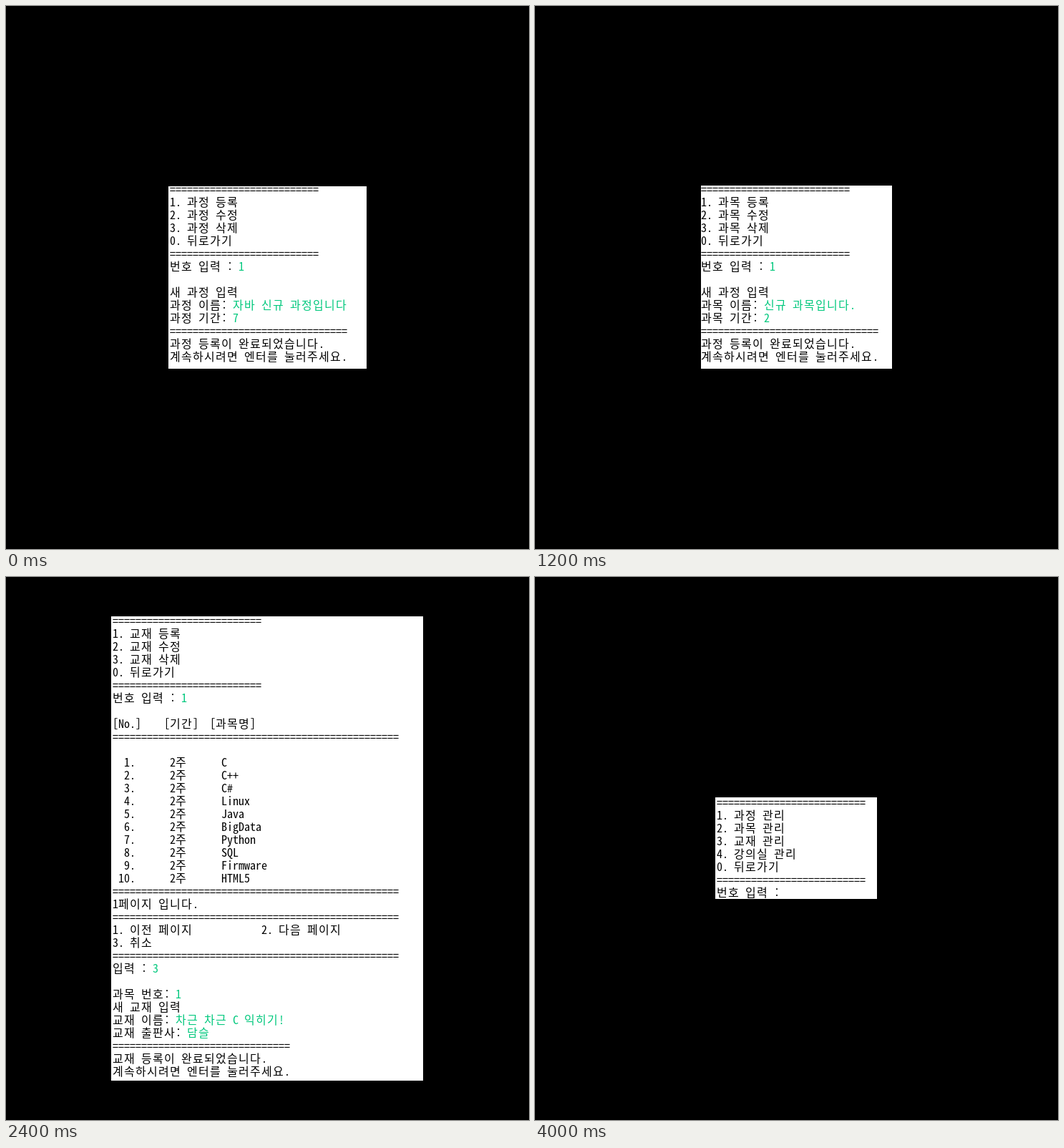
An HTML page for the animation above (4400 ms loop, 731 by 759 pixels).

```html
<!DOCTYPE html>
<html lang="ko">
<head>
<meta charset="utf-8">
<title>콘솔 화면</title>
<style>
  html, body { margin: 0; width: 100%; height: 100%; overflow: hidden; background: #000; }
  svg { display: block; }
  text {
    font: 16px "Noto Sans Mono CJK KR", "Noto Sans Mono CJK JP", "Noto Sans CJK KR", "Noto Sans CJK JP", monospace;
    white-space: pre;
    fill: #000;
  }
  .in { fill: #00c87d; }
</style>
</head>
<body>
<svg id="stage" width="731" height="759" viewBox="0 0 731 759"></svg>
<script>
const STEP = 400, COL = 8, ROW = 18;
const stage = document.getElementById('stage');

const bar = n => '='.repeat(n);
const pressEnter = '계속하시려면 엔터를 눌러주세요.';
const back = '0. 뒤로가기';
const book = '차근 차근 C 익히기!', press = '담슬';

// Everything after ^ is typed by the user.
const menu = (what, pick) => [
  bar(26), `1. ${what} 등록`, `2. ${what} 수정`, `3. ${what} 삭제`, back, bar(26), `번호 입력 : ^${pick}`, ''
];
const mainMenu = pick => [
  bar(26), '1. 과정 관리', '2. 과목 관리', '3. 교재 관리', '4. 강의실 관리', back, bar(26), `번호 입력 : ^${pick}`
];
const pager = page => [
  bar(50), `${page}페이지 입니다.`, bar(50),
  '1. 이전 페이지' + ' '.repeat(12) + '2. 다음 페이지', '3. 취소', bar(50), '입력 : ^3', ''
];
const done = msg => [`${msg} 완료되었습니다.`, pressEnter];
const edit = (what, no, fields) => [
  back, `수정할 ${what} 번호 입력:^${no}`, '', bar(27), '수정할 내용을 입력하세요.',
  ...fields, bar(31), ...done(what + ' 수정이')
];
const remove = (what, no) => [
  back, `삭제할 ${what} 번호 입력:^${no}`, '', bar(27), ...done(what + ' 삭제가')
];

const courses = [
  '5.5|자바(JAVA)를 활용한 풀스택 융합 SW개발자 양성과정',
  '6|JAVA기반의 스마트 웹 앱콘텐츠 양성과정',
  '5.5|Java/JavaScript library을 활용한 반응형',
  '7|빅데이터 UI 서비스 개발자 양성과정',
  '5.5|Java기반 멀티 플랫폼 SW개발자 양성 과정',
  '6|파이썬기반빅데이터개발자',
  '6|Java/Python을 활용한 웹 애플리케이션 개발자 양성과정',
  '7|자바 기반 모바일 융합SW 개발자 양성과정',
  '7|빅데이터분석을 위한 AI(머신러닝,딥러닝)응용소프트웨어 개발자',
  '5.5|웹기반응용SW개발자양성',
  '7|자바 스프링 백엔드 개발자 양성 과정',
  '6|스마트웹콘텐츠개발(웹디자인/웹퍼블리셔) 전문가 양성과정',
  '5.5|빅데이터 시각화를 통한 빅데이터 UI 콘텐츠 개발',
  '6|스마트웹/콘텐츠개발(웹퍼블리셔)양성과정',
  '7|스마트웹/콘텐츠개발(웹/멀티미디어)',
  '5.5|디지털컨버전스 기반 자바 Open Source Web application 전문 개발자 양성과정',
  '7|디지털컨버전스 기반 Framework 전문 개발자 양성과정',
  '5.5|UI/UX디자인 웹퍼블리셔 / 프론트엔드 개발자 양성과정 (N.09) G',
  '6|빅데이터를 활용한 지능형웹(UI/UX) 개발자',
  '5.5|오픈소스 프레임워크기반의 자바 웹 개발자 양성 과정'
];
const courseList = last => [
  bar(84), '[No.]    [기간]  [과정명]',
  ...[...courses, last].map((c, i) => {
    const [months, name] = c.split('|');
    return `${i + 1}`.padStart(4) + months.padStart(7) + '개월  ' + name;
  }),
  bar(84)
];
const tenRows = first => Array.from({ length: 10 }, (_, i) => ` ${41 + i}.` + (i ? '' : first));
const subjects = ['C', 'C++', 'C#', 'Linux', 'Java', 'BigData', 'Python', 'SQL', 'Firmware', 'HTML5'];
const gap = ' '.repeat(6);

// box: left, top, right, bottom; x: first column; y: middle of the first row
const scenes = [
  { box: [227, 252, 504, 507], x: 229, y: 256, rows: [
    ...menu('과정', 1), '새 과정 입력', '과정 이름: ^자바 신규 과정입니다', '과정 기간: ^7',
    bar(31), ...done('과정 등록이')] },
  { box: [2, 0, 728, 759], x: 2, y: 7, rows: [
    ...menu('과정', 2), ...courseList('7|자바 신규 과정입니다'),
    ...edit('과정', 21, ['과정 이름: ^자바 신규 과정입니다. 22', '과정 기간: ^6'])] },
  { box: [0, 24, 731, 734], x: 2, y: 31, rows: [
    ...menu('과정', 3), ...courseList('6|자바 신규 과정입니다. 22'), ...remove('과정', 21)] },
  { box: [232, 251, 499, 507], x: 232, y: 256, rows: [
    ...menu('과목', 1), '새 과정 입력', '과목 이름: ^신규 과목입니다.', '과목 기간: ^2',
    bar(31), ...done('과정 등록이')] },
  { box: [153, 123, 578, 635], x: 152, y: 137, rows: [
    ...tenRows(' 2주        신규 과목입니다.'), ...pager(5),
    ...edit('과목', 41, ['과목 이름: ^신규 과목입니다. 22', '과목 기간: ^3'])] },
  { box: [153, 150, 578, 608], x: 152, y: 164, rows: [
    ...tenRows(' 3주        신규 과목입니다. 22'), ...pager(5), ...remove('과목', 41)] },
  { box: [147, 55, 583, 704], x: 149, y: 61, rows: [
    ...menu('교재', 1), '[No.]    [기간]  [과목명]', bar(50), '',
    ...subjects.map((s, i) => `${i + 1}.`.padStart(4) + gap + '2주' + gap + s),
    ...pager(1), '과목 번호: ^1', '새 교재 입력', `교재 이름: ^${book}`, `교재 출판사: ^${press}`,
    bar(31), ...done('교재 등록이')] },
  { box: [119, 117, 612, 642], x: 121, y: 124, rows: [
    ...tenRows(` ${press}       ${book}`), ...pager(5),
    ...edit('교재', 41, ['과목 번호: ^1', `교재 이름: ^${book} 22`, `교재 출판사: ^${press}`])] },
  { box: [110, 150, 620, 608], x: 112, y: 164, rows: [
    ...tenRows(` ${press}       ${book} 22`), ...pager(5), ...remove('교재', 41)] },
  { box: [107, 114, 623, 644], x: 109, y: 121, rows: [
    ...mainMenu(4), '', bar(31), ' [강의실]  [인원수]',
    ...[30, 30, 30, 26, 26, 26].map((n, i) => ` ${i + 1} 강의실   ${n} 명`),
    bar(31), '', back, '조회할 강의실 번호 입력 :^1', '', bar(27), '[1 강의실]',
    '진행과정명 : ' + courses[0].split('|')[1], '진행과정기간 : 20/03/06 ~ 20/08/25', '담당교사 : 윤서람',
    bar(27), pressEnter] },
  { box: [252, 308, 478, 450], x: 254, y: 315, rows: mainMenu('') }
];

function add(parent, tag, attrs, text) {
  const el = document.createElementNS('http://www.w3.org/2000/svg', tag);
  for (const k in attrs) el.setAttribute(k, attrs[k]);
  if (text) el.textContent = text;
  parent.append(el);
  return el;
}

// Console grid: Hangul takes two columns, everything else one.
function drawRow(group, row, x, y) {
  const line = add(group, 'text', { y });
  row.split('^').forEach((part, i) => {
    if (!part) return;
    const xs = [...part].map(ch => {
      const at = x;
      x += ch.charCodeAt(0) > 0x1100 ? 2 * COL : COL;
      return at;
    });
    add(line, 'tspan', { x: xs.join(' '), class: i ? 'in' : 'out' }, part.replace(/ /g, '\u00a0'));
  });
}

const groups = scenes.map(({ box: [l, t, r, b], x, y, rows }) => {
  const g = add(stage, 'g', { visibility: 'hidden' });
  add(g, 'rect', { x: l, y: t, width: r - l, height: b - t, fill: '#fff' });
  rows.forEach((row, i) => row && drawRow(g, row, x, y + 6 + i * ROW));
  return g;
});

const start = performance.now();
let shown = -1;
function tick() {
  const now = Math.floor((performance.now() - start) / STEP) % groups.length;
  if (now !== shown) {
    groups.forEach((g, i) => g.setAttribute('visibility', i === now ? 'visible' : 'hidden'));
    shown = now;
  }
  requestAnimationFrame(tick);
}
tick();
</script>
</body>
</html>
```
